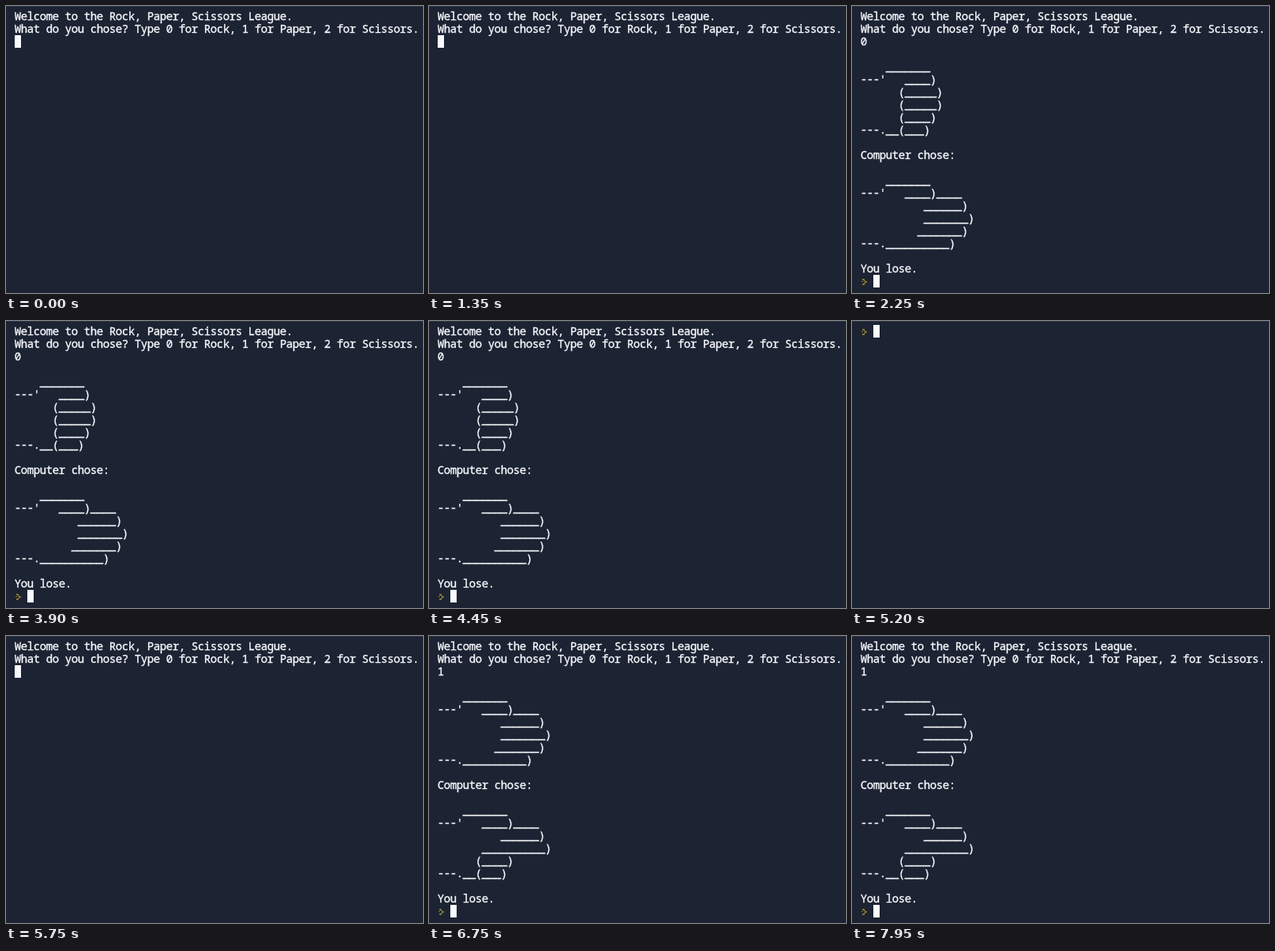
An HTML page with a canvas that plays this animation: 528 px wide and 364 px high, repeating every 8000 ms.

```html
<!DOCTYPE html>
<html lang="en">
<head>
<meta charset="utf-8">
<title>Rock, Paper, Scissors</title>
<style>
  html, body { margin: 0; width: 100%; height: 100%; overflow: hidden; background: #1c2333; }
  canvas { display: block; }
</style>
</head>
<body>
<canvas id="stage" width="528" height="364"></canvas>
<script>
const ctx = document.getElementById('stage').getContext('2d');
const LOOP = 8000, LEFT = 11, TOP = 5, CELL = 8, ROW = 16, BASELINE = 13;

const ROCK = `    _______
---'   ____)
      (_____)
      (_____)
      (____)
---.__(___)`;
const PAPER = `    _______
---'   ____)____
          ______)
          _______)
         _______)
---.__________)`;
const SCISSORS = `    _______
---'   ____)____
          ______)
       __________)
      (____)
---.__(___)`;
const INTRO = `Welcome to the Rock, Paper, Scissors League.
What do you chose? Type 0 for Rock, 1 for Paper, 2 for Scissors.
`;
const PROMPT = '\u203a ';

const result = (key, mine, theirs) =>
  `${INTRO}${key}\n\n${mine}\n\nComputer chose:\n\n${theirs}\n\nYou lose.\n${PROMPT}`;

// Start time of each terminal state; the cursor follows the last character.
const states = [
  [0, INTRO],
  [1400, INTRO + '0'],
  [1900, result(0, ROCK, PAPER)],
  [4850, PROMPT],
  [5250, INTRO],
  [6250, INTRO + '1'],
  [6650, result(1, PAPER, SCISSORS)],
];

function drawPrompt(y) {
  ctx.fillStyle = '#857832';
  ctx.fillRect(13, y + 5, 3, 2);
  ctx.fillRect(13, y + 11, 3, 2);
  ctx.fillRect(12, y + 8, 2, 1);
  ctx.fillRect(15, y + 7, 2, 1);
  ctx.fillRect(16, y + 8, 3, 2);
  ctx.fillRect(15, y + 10, 2, 1);
}

// Each character sits centred in its own terminal cell.
function drawLine(line, y) {
  ctx.fillStyle = ctx.strokeStyle = '#f8fafd';
  [...line].forEach((char, col) => {
    const x = LEFT + (col + 0.5) * CELL;
    ctx.fillText(char, x, y + BASELINE);
    ctx.strokeText(char, x, y + BASELINE);
  });
}

function draw(text) {
  ctx.fillStyle = '#1c2333';
  ctx.fillRect(0, 0, 528, 364);
  ctx.fillStyle = '#2b3245';
  ctx.fillRect(0, 0, 528, 1);

  const lines = text.split('\n');
  lines.forEach((line, row) => {
    const y = TOP + row * ROW;
    if (line === PROMPT) drawPrompt(y);
    else drawLine(line, y);
  });

  const row = lines.length - 1;
  ctx.fillStyle = '#f8fafd';
  ctx.fillRect(LEFT + lines[row].length * CELL, TOP + row * ROW, CELL, ROW);
}

ctx.font = '14px "Noto Sans Mono", monospace';
ctx.textAlign = 'center';
ctx.lineWidth = 0.35;
ctx.lineJoin = 'round';

const start = performance.now();
function tick() {
  const t = (performance.now() - start) % LOOP;
  draw(states.findLast(([from]) => t >= from)[1]);
  requestAnimationFrame(tick);
}
tick();
</script>
</body>
</html>
```
